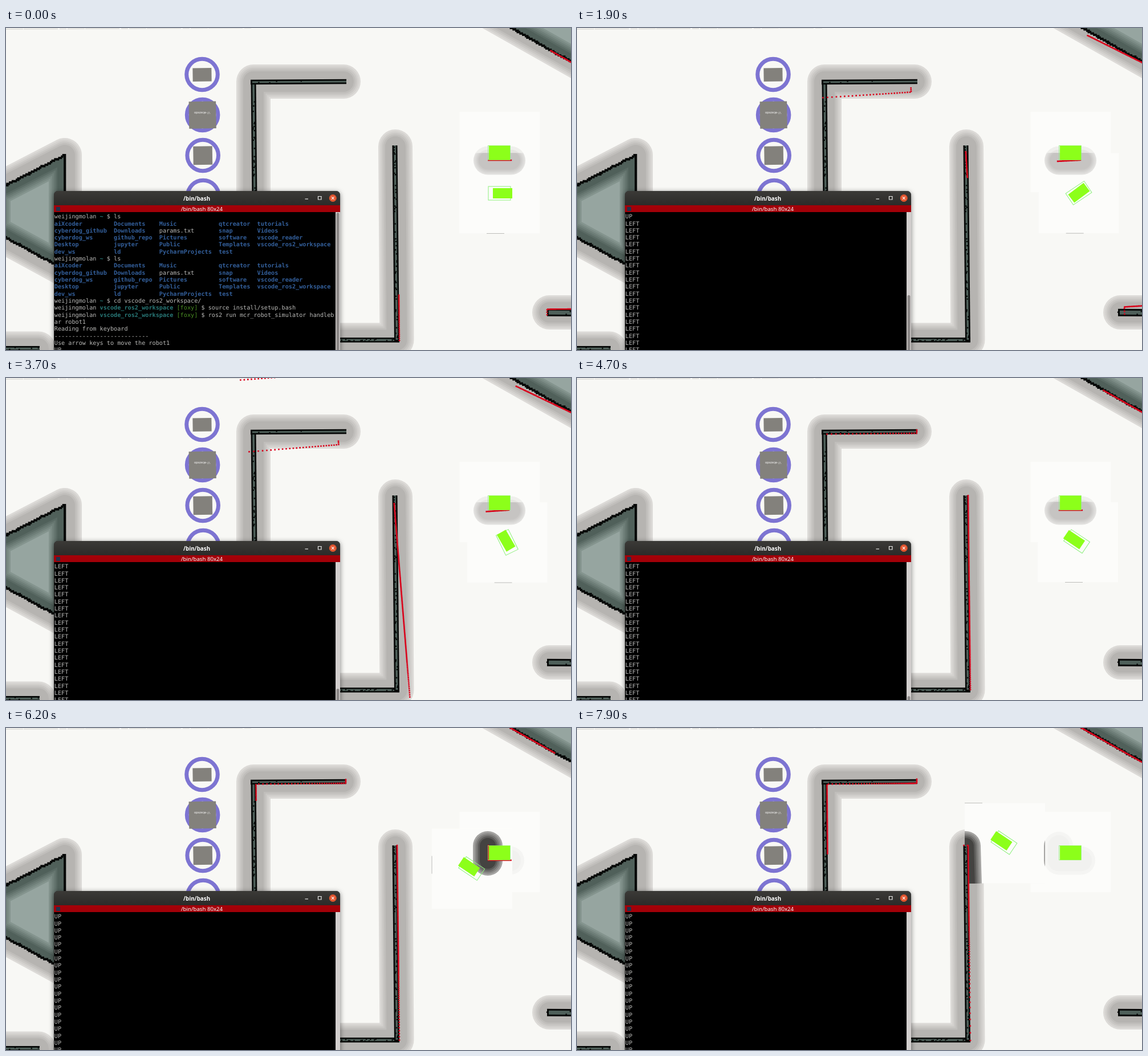
An HTML page that plays this animation: 991x565 px, repeating every 8000 ms.

```html
<!DOCTYPE html>
<html lang="en">
<head>
<meta charset="utf-8">
<title>Robot simulator</title>
<style>
  html, body { margin: 0; width: 100%; height: 100%; overflow: hidden; background: #f8f8f5; }
  svg { display: block; width: 991px; height: 565px; }
  .mono { font: 10.2px "DejaVu Sans Mono", monospace; fill: #b9b9b7; text-rendering: geometricPrecision; }
  .mono text { white-space: pre; }
  .dir { fill: #335f9b; font-weight: bold; }
  .cwd { fill: #287877; font-weight: bold; }
  .env { fill: #4a8f24; }
  .ui { font-family: "Noto Sans", sans-serif; fill: #fff; text-anchor: middle; }
</style>
</head>
<body>
<svg id="stage" viewBox="0 0 991 565" xmlns="http://www.w3.org/2000/svg"></svg>
<script>
const LOOP = 8000, ROW = 12.32, MAP = 141, CELL = 2.4;
const BLACK = '#060807', TEAL = '#4f605a';
const WEDGE = 'M-20 286.5L103 223V424L-20 357Z';
const CORNER = 'M832 -30L1044 90V-30Z';

const ramp = (t, a, b) => Math.min(1, Math.max(0, (t - a) / (b - a)));
const rad = deg => deg * Math.PI / 180;
let seed = 7;
const random = () => (seed = seed * 16807 % 2147483647) / 2147483647;

const line = (d, c, w, extra = '') => `<path d="${d}" fill="none" stroke="${c}" stroke-width="${w}" ${extra}/>`;
const rect = (x, y, w, h, c, extra = '') =>
  `<rect x="${x}" y="${y}" width="${w}" height="${h}" fill="${c}" ${extra}/>`;
const square = (x, y, s) => `M${(x - s / 2).toFixed(1)} ${(y - s / 2).toFixed(1)}h${s}v${s}h${-s}z`;

// Stacked strokes that shrink from one radius and colour to another
function glow(d, r0, r1, c0, c1, steps = 5) {
  let out = '';
  for (let i = 0; i < steps; i++) {
    const k = i / (steps - 1), r = r0 + (r1 - r0) * k;
    out += line(d, c0, 2 * r, `stroke-linecap="round" stroke-linejoin="round"
      style="stroke:color-mix(in srgb, ${c1} ${k * 100}%, ${c0})"`);
  }
  return out;
}
const halo = d => glow(d, 30, 18, '#dcdad7', '#b6b4b1');

// Visits a segment cell by cell
function walk(x0, y0, x1, y1, visit) {
  const n = Math.hypot(x1 - x0, y1 - y0) / CELL;
  for (let i = 0; i <= n; i++) visit(x0 + (x1 - x0) * i / n, y0 + (y1 - y0) * i / n);
}
function stair(...ends) {
  let d = '';
  const snap = v => Math.round(v / CELL) * CELL;
  walk(...ends, (x, y) => d += square(snap(x), snap(y), 4.2));
  return `<path d="${d}" fill="${BLACK}"/>`;
}
function wall(x0, y0, x1, y1, width = 9, core = 3.6, noise = 0.3) {
  const d = `M${x0} ${y0}L${x1} ${y1}`;
  let specks = '';
  walk(x0, y0, x1, y1, (x, y) => {
    const off = (random() - 0.5) * core;
    const across = Math.abs(x1 - x0) > Math.abs(y1 - y0);
    if (random() < noise) specks += square(x + (across ? 0 : off), y + (across ? off : 0), CELL);
  });
  return line(d, BLACK, width, 'stroke-linecap="butt"') +
    line(d, TEAL, core, 'stroke-dasharray="2000" stroke-dashoffset="-3"') + `<path d="${specks}" fill="${BLACK}"/>`;
}
const solid = (d, id) => `<clipPath id="${id}"><path d="${d}"/></clipPath><path d="${d}" fill="#96a5a0"/>
  <g clip-path="url(#${id})">${glow(d, 28, 13, '#84948e', '#50605a', 6)}</g>`;

const ring = i => `<circle cx="${344 + i * 0.6}" cy="${81.5 + i * 71}" r="27.3" fill="none" stroke="#7d74d2" stroke-width="7"/>`;
const box = (x, y, w, h) => rect(x - w / 2, y - h / 2, w, h, '#83817c', `transform="rotate(-.8 ${x} ${y})"`);

const stage = document.getElementById('stage');
stage.innerHTML = `
  ${rect(0, 0, 991, 565, '#f8f8f5')}
  ${line('M0 2L430 0', '#dddcd8', 1.5, 'stroke-dasharray="30 1 60 3 12 2"')}
  ${halo('M434 300V94H592')}${halo('M560 547.5H685.5L683 208')}
  ${halo('M-20 562.5H57')}${halo('M953 499H1020')}
  ${halo(WEDGE)}${halo('M838 -33L1050 87')}
  ${solid(WEDGE, 'wedge')}${solid(CORNER, 'corner')}
  ${stair(-20, 286.5, 103, 223)}${stair(103, 223, 103, 424)}${stair(103, 424, -20, 357)}
  ${stair(834, -30, 1046, 90)}
  ${[0, 1, 2, 3].map(ring).join('')}
  ${box(344, 82, 33, 23.5)}${box(344.7, 152.7, 47.5, 47.5)}${box(345.2, 223.7, 33.5, 32.5)}
  <text transform="translate(344 146.5) scale(1 -1)" class="ui" font-size="5.4">obstacle-1/</text>
  ${rect(795.5, 147, MAP, MAP, '#fcfcfa')}
  <g id="traceNear">${glow('M845 232.5H886', 25, 19, '#efefec', '#e6e5e2', 2)}</g>
  <g id="traceFar">${glow('M845 207V232.5H884', 25, 19, '#f5f5f3', '#f1f1ef', 2)}</g>
  <clipPath id="view"><rect id="viewBox" width="${MAP}" height="${MAP}"/></clipPath>
  <g clip-path="url(#view)">
    <rect id="patch" width="${MAP}" height="${MAP}" fill="#fcfcfa"/>
    <g id="near">${glow('M845 232.5H886', 25, 16, '#e2e1df', '#c6c4c2')}</g>
    <g id="far">${['M845 207V233', 'M682 207L685 310'].map(d => glow(d, 26, 14, '#a5a4a2', '#444341')).join('')}</g>
  </g>
  <path id="mark" fill="none" stroke="#bdbdba"/>
  ${wall(436, 300, 434, 91)}${wall(429, 95, 597, 94, 8.5, 3, 0.05)}
  ${wall(560, 547.5, 690, 547.5, 8.5)}${wall(685.5, 550, 682, 206)}
  ${wall(-20, 562.5, 59, 562.5)}${wall(949, 499.3, 1020, 499.6, 13, 7, 0.1)}
  <path id="scan" fill="#d9041c"/>
  ${rect(845.5, 206.5, 39, 25, 'none', 'stroke="#8df07c" stroke-width=".8"')}${rect(847, 206.5, 37, 25, '#8cff1a')}
  <rect id="edge" x="-19.5" y="-12" width="39" height="24" fill="none" stroke="#8df07c"/>
  <rect id="body" x="-17" y="-9" width="34" height="18" fill="#8cff1a"/>
  <linearGradient id="bar" x2="0" y2="1"><stop stop-color="#3b3a37"/><stop offset="1" stop-color="#2b2a28"/></linearGradient>
  <g style="filter:drop-shadow(0 2px 4px rgba(0,0,0,.5))">
    <path d="M84 580V293a7 7 0 0 1 7-7H579a7 7 0 0 1 7 7V580Z" fill="#2b2a28"/>
  </g>
  ${rect(84, 286, 502, 26, 'url(#bar)', 'rx="7"')}
  ${rect(84, 311, 502, 12, '#a30008')}
  ${rect(84.5, 323, 493.5, 242, '#000')}
  ${rect(578, 323, 8, 242, '#d2cecd')}
  <rect id="thumb" x="579.5" width="5" height="300" rx="2.5" fill="#8b8786"/>
  ${rect(88, 314, 7, 7, '#24324c')}
  <text class="ui" x="334.5" y="302.5" font-size="9.8" font-weight="bold">/bin/bash</text>
  <text class="ui" x="343.5" y="321" font-size="9.65">/bin/bash 80x24</text>
  ${line('M524.5 300H530', '#e8e8e6', 1.2)}
  ${line('M547.5 295.5h5.5v5.5h-5.5z', '#e8e8e6', 1.2)}
  <circle cx="573.3" cy="298.5" r="6.5" fill="#e2552f"/>
  ${line('M571 296.2l4.6 4.6m0-4.6l-4.6 4.6', '#fff', 1.1)}
  <g id="rows" class="mono"></g>`;

const $ = id => document.getElementById(id);
const show = (id, on) => $(id).style.display = on ? '' : 'none';

// Terminal contents
const span = (cls, s) => `<tspan class="${cls}">${s}</tspan>`;
const USER = 'weijingmolan';
const home = cmd => `${USER} ${span('cwd', '~')} $ ${cmd}`;
const work = cmd => `${USER} ${span('cwd', 'vscode_ros2_workspace')} ${span('env', '[foxy]')} $ ${cmd}`;
const COLS = [17, 13, 17, 11, 0];
const listing = [
  'aiXcoder Documents Music qtcreator tutorials',
  'cyberdog_github Downloads params.txt snap Videos',
  'cyberdog_ws github_repo Pictures software vscode_reader',
  'Desktop jupyter Public Templates vscode_ros2_workspace',
  'dev_ws ld PycharmProjects test'
].map(r => r.split(' ').map((s, i) => {
  const cell = s.padEnd(COLS[i]);
  return s.includes('.') ? cell : span('dir', cell);
}).join(''));
const HEAD = [
  home('ls'), ...listing, home('ls'), ...listing, home('cd vscode_ros2_workspace/'),
  work('source install/setup.bash'), work('ros2 run mcr_robot_simulator handleb'), 'ar robot1',
  'Reading from keyboard', '-'.repeat(27), 'Use arrow keys to move the robot1'
];

// Key presses so far: forward, turn left, forward again
const UPS = 5, LEFTS = 87;
const firstUps = t => 1 + (UPS - 1) * ramp(t, 600, 1100);
const lefts = t => 22 * ramp(t, 1300, 1900) + 27 * ramp(t, 2000, 2670) +
  26 * ramp(t, 2800, 3900) + 12 * ramp(t, 4100, 4400);
const lastUps = t => 0.03 * Math.max(0, t - 4600);

function rowText(i) {
  const key = i - HEAD.length;
  return HEAD[i] ?? (key >= UPS && key < UPS + LEFTS ? 'LEFT' : 'UP');
}
function drawTerminal(t) {
  const keys = [firstUps, lefts, lastUps].reduce((n, f) => n + Math.floor(f(t) + 0.01), 0);
  const scroll = Math.max(0, HEAD.length + keys + 1 - 24);
  let out = '';
  for (let r = 0; r < 20; r++)
    out += `<text x="84.8" y="${334.2 + r * ROW}">${rowText(scroll + r)}</text>`;
  $('rows').innerHTML = out;
  $('thumb').setAttribute('y', 324 + 296 * scroll / (scroll + 24));
}

// The outline trails the body in heading and sits a little behind it.
const heading = t => -1.68 * lefts(t);
function edgePose(t) {
  const a = heading(t - 50), turned = lefts(t) / LEFTS;
  const far = 0.048 * Math.max(0, t - 4650);
  return [
    865.5 + 15 * ramp(t, 600, 1100) - 2 * turned + far * Math.cos(rad(a)),
    290 - 2 * turned + far * Math.sin(rad(a)), a
  ];
}
function bodyPose(t) {
  const [x, y] = edgePose(t), a = heading(t + 50);
  const lead = 5.5 - 5 * (ramp(t, 700, 1100) - ramp(t, 2700, 4400));
  return [x + lead * Math.cos(rad(a)), y + lead * Math.sin(rad(a)), a];
}

// Surfaces the laser can hit
const chain = p => p.slice(1).map((q, i) => [...p[i], ...q]);
const SURFACES = [
  ...chain([[440, 300], [438.5, 98.5], [596, 97], [596, 89]]),
  ...chain([[678, 206], [686, 206], [690, 550]]),
  ...chain([[949, 506], [949, 493.5], [1100, 492]]),
  ...chain([[846, 206], [846, 232], [886, 232], [886, 206], [846, 206]]),
  ...chain([[400, -28], [832, -30], [1044, 90]])
];
function hit(x, y, dx, dy) {
  let best = Infinity;
  for (const [ax, ay, bx, by] of SURFACES) {
    const ex = bx - ax, ey = by - ay, det = dx * ey - dy * ex;
    if (!det) continue;
    const d = ((ax - x) * ey - (ay - y) * ex) / det;
    const s = ((ax - x) * dy - (ay - y) * dx) / det;
    if (d > 0 && s >= 0 && s <= 1 && d < best) best = d;
  }
  return best;
}
// Points are sensed at one heading and placed with the display's lag.
function drawScan([x, y, a], lag) {
  let d = '';
  for (let deg = a - 135; deg <= a + 135; deg += 0.4) {
    const r = rad(deg), q = rad(deg + lag);
    const dist = hit(x, y, Math.cos(r), Math.sin(r));
    if (dist < Infinity) d += square(x + dist * Math.cos(q), y + dist * Math.sin(q), 2.6);
  }
  $('scan').setAttribute('d', d);
}

// The local map jumps to the robot at a fixed period.
function drawMap(t) {
  const period = 560, phase = 20;
  const [cx, cy] = edgePose(Math.floor((t - phase) / period) * period + phase);
  const x = cx - MAP / 2, y = cy - MAP / 2;
  for (const id of ['viewBox', 'patch']) {
    $(id).setAttribute('x', x);
    $(id).setAttribute('y', y);
  }
  const late = t >= 5600;
  const mark = !late ? [x + 48, y + MAP, 'h31'] : t < 7300 ? [x, y + 48, 'v31'] : [x, y, 'h31'];
  $('mark').setAttribute('d', `M${mark[0]} ${mark[1]}${mark[2]}`);
  for (const [id, on] of [['near', !late], ['traceNear', !late], ['far', late], ['traceFar', late]]) show(id, on);
}

const place = (id, [x, y, a]) => $(id).setAttribute('transform', `translate(${x} ${y}) rotate(${a})`);
function render(t) {
  const body = bodyPose(t), edge = edgePose(t);
  drawTerminal(t);
  drawMap(t);
  drawScan(edge, body[2] - edge[2]);
  place('body', body);
  place('edge', edge);
}

// The display refreshes ten times a second, five while the keys are tapped.
function tick(t) {
  const step = t >= 2700 && t < 4100 ? 200 : 100;
  return 100 + Math.floor((t - 100) / step) * step;
}
let last = -1;
function loop() {
  const t = Math.max(0, tick(performance.now() % LOOP));
  if (t !== last) render(last = t);
  requestAnimationFrame(loop);
}
loop();
</script>
</body>
</html>
```
